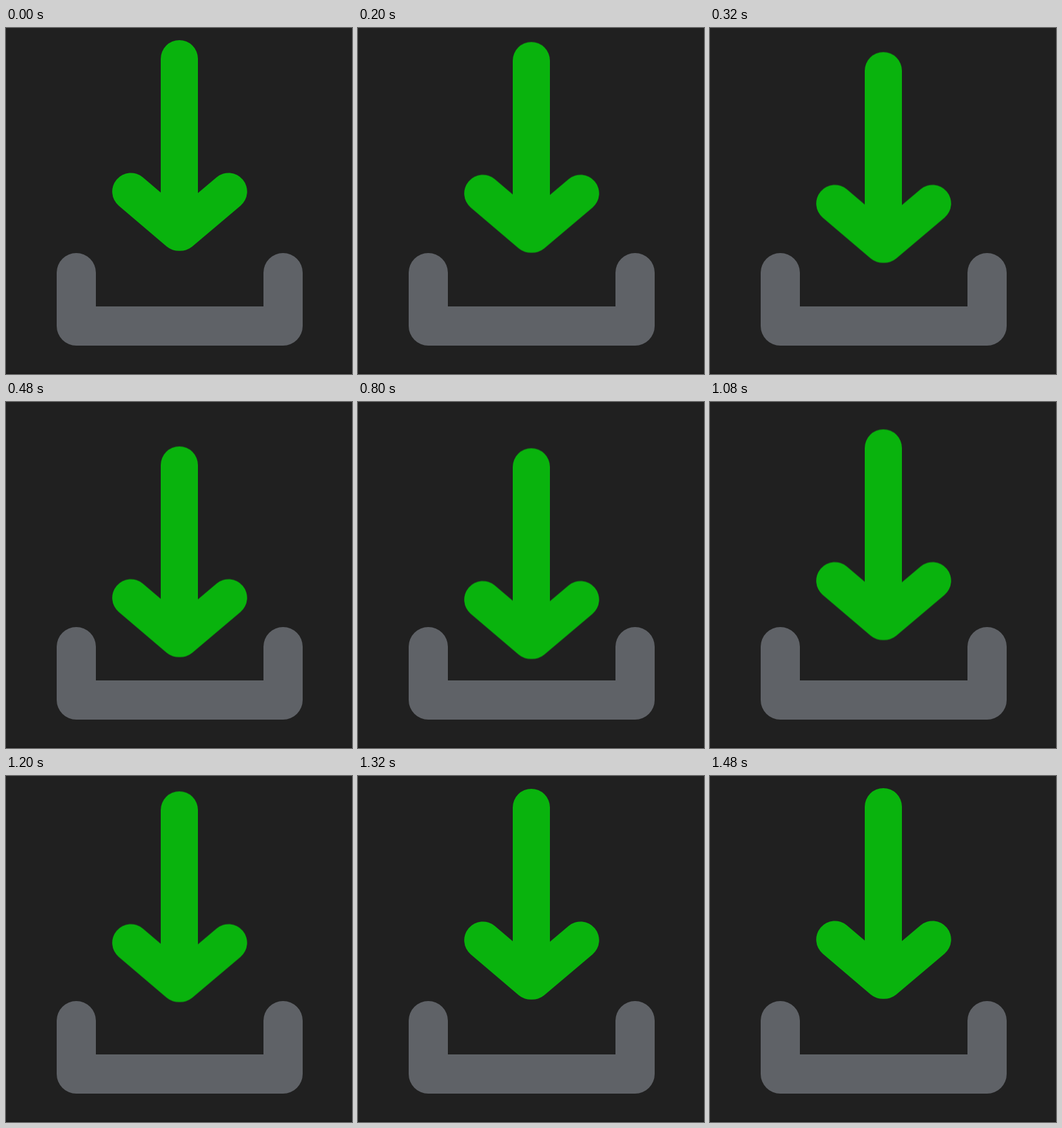
An HTML page that plays this animation: 512 by 512 pixels, repeating every 1520 ms.

```html
<!DOCTYPE html>
<html lang="en">
<head>
<meta charset="utf-8">
<title>Download</title>
<style>
  html, body { margin: 0; width: 100%; height: 100%; overflow: hidden; background: #202020; }
  svg { display: block; width: 100vw; height: 100vh; }
  path { fill: none; stroke-linecap: round; stroke-linejoin: round; }
  .tray { stroke: #5f6267; stroke-width: 58; }
  .arrow { stroke: #09b30d; stroke-width: 55; }
</style>
</head>
<body>
<svg viewBox="0 0 512 512">
  <rect width="512" height="512" fill="#202020"/>
  <rect y="510.5" width="512" height="1.5" fill="#1b1919"/>
  <path class="tray" d="M104 362V441H410V362"/>
  <g id="arrow">
    <path class="arrow" d="M256.5 45.5V300M184.7 242L255.5 302.3M329.3 242L258 302.3"/>
  </g>
</svg>
<script>
  const LOOP = 1520, STEP = 40, DROP = 50.6;

  // Ease curve with control points (a, 0) and (b, 1)
  const ease = (a, b) => x => {
    if (x <= 0) return 0;
    if (x >= 1) return 1;
    let lo = 0, hi = 1;
    for (let i = 0; i < 30; i++) {
      const s = (lo + hi) / 2, r = 1 - s;
      if (3 * r * r * s * a + 3 * r * s * s * b + s ** 3 < x) lo = s; else hi = s;
    }
    return lo * lo * (3 - 2 * lo);
  };

  const down = ease(0.89, 0);
  const up = ease(0.8, 0.08);
  const offset = t => DROP * (down(t / 714) - up((t - 753) / 706));

  const frames = [];
  for (let t = 0; t <= LOOP; t += STEP) {
    frames.push({
      offset: t / LOOP,
      transform: `translateY(${offset(t).toFixed(2)}px)`,
      easing: 'step-end'
    });
  }
  document.getElementById('arrow').animate(frames, { duration: LOOP, iterations: Infinity });
</script>
</body>
</html>
```
